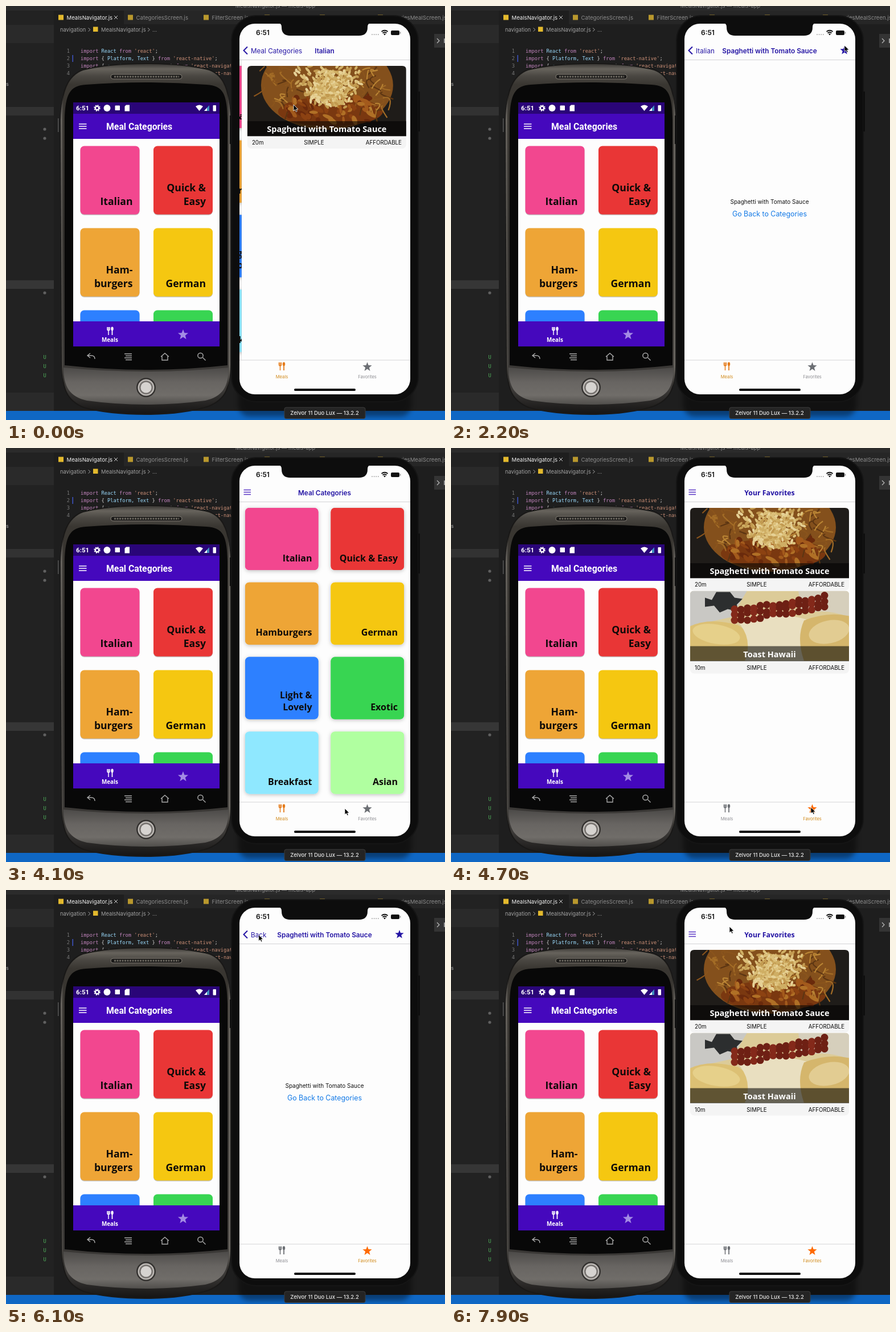
These frames come from a looping animation (771 px wide and 726 px high, 8 s). An HTML page:

```html
<!DOCTYPE html>
<html lang="en">
<head>
<meta charset="utf-8">
<title>Meals app on two phones</title>
<style>
html, body { margin: 0; width: 100%; height: 100%; overflow: hidden; background: #1e1e1e; }
svg { display: block; width: 100vw; height: 100vh; }
text { white-space: pre; }
.ui { font-family: Inter, "Liberation Sans", sans-serif; }
.bold { font-family: "Open Sans", sans-serif; font-weight: 700; }
.droid { font-family: Roboto, sans-serif; font-weight: 700; }
.code { font-family: "DejaVu Sans Mono", monospace; font-size: 8.7px; }
</style>
</head>
<body>
<svg id="stage" viewBox="0 0 771 726" preserveAspectRatio="none"></svg>
<script>
const LOOP = 8000, STEP = 100;
const INK = '#2414a4', VIOLET = '#4508bd';
const COLORS = ['#f2478f', '#e93636', '#eea536', '#f5c711', '#2d80ff', '#38d552', '#8fe8ff', '#b0ffa0'];

// Drawing helpers
const rect = (x, y, w, h, fill, r = 0, more = '') =>
  `<rect x="${x}" y="${y}" width="${w}" height="${h}" rx="${r}" fill="${fill}" ${more}/>`;
const circle = (x, y, r, fill, more = '') => `<circle cx="${x}" cy="${y}" r="${r}" fill="${fill}" ${more}/>`;
const ellipse = (x, y, rx, ry, fill, turn = 0) =>
  `<ellipse cx="${x}" cy="${y}" rx="${rx}" ry="${ry}" fill="${fill}" transform="rotate(${turn} ${x} ${y})"/>`;
const path = (d, fill, more = '') => `<path d="${d}" fill="${fill}" ${more}/>`;
const line = (d, color, width = 1, more = '') => path(d, 'none', `stroke="${color}" stroke-width="${width}" ${more}`);
const text = (x, y, s, size, fill, cls = 'ui', anchor = 'start', more = '') =>
  `<text x="${x}" y="${y}" font-size="${size}" fill="${fill}" class="${cls}" text-anchor="${anchor}" ${more}>${s.replace(/&/g, '&amp;')}</text>`;
const group = (id, body, more = '') => `<g id="${id}" ${more}>${body}</g>`;
const gradient = (id, stops, dir = 'x2="0" y2="1"') => `<linearGradient id="${id}" ${dir}>` +
  stops.map(([o, c, a = 1]) => `<stop offset="${o}" stop-color="${c}" stop-opacity="${a}"/>`).join('') + '</linearGradient>';
const range = n => [...Array(n).keys()];

function star(x, y, r, fill) {
  const points = range(10).map(i => {
    const a = Math.PI * (i / 5 - .5), q = i % 2 ? r * .42 : r;
    return `${(x + q * Math.cos(a)).toFixed(2)},${(y + q * Math.sin(a)).toFixed(2)}`;
  });
  return `<polygon points="${points.join(' ')}" fill="${fill}"/>`;
}
const cutlery = (x, y, color) =>
  line(`M${x - 5} ${y - 7}v4q0 2 2 2q2 0 2-2v-4M${x - 3} ${y - 7}v14`, color, 1.5) +
  line(`M${x + 3.5} ${y - 1}v8`, color, 1.8) + ellipse(x + 3.5, y - 4, 2.2, 3.4, color);
const burger = (x, y, w, gap, color) =>
  line([-1, 0, 1].map(i => `M${x} ${y + i * gap}h${w}`).join(''), color, 1.3);

function seeded(seed) {
  return () => (seed = (seed * 16807) % 2147483647) / 2147483647;
}

// Dish pictures in a 279 x 123 box
function spaghetti() {
  const rnd = seeded(77), pick = list => list[Math.floor(rnd() * list.length)];
  let out = rect(0, 0, 279, 123, '#1f1c19') + ellipse(140, 34, 116, 78, '#84501c') + ellipse(146, 80, 92, 26, '#7a3810');
  for (let i = 0; i < 60; i++) {
    const x = rnd() < .5 ? 26 + rnd() * 62 : 192 + rnd() * 52, y = rnd() * 78;
    out += line(`M${x} ${y}q${rnd() * 40 - 20} ${rnd() * 14 - 7} ${rnd() * 40 - 20} ${rnd() * 22}`, pick(['#b98434', '#a36c26', '#8a541c', '#5c3512']), 2.2);
  }
  for (let i = 0; i < 70; i++)
    out += ellipse(68 + rnd() * 150, 56 + rnd() * 42, 4 + rnd() * 6, 2 + rnd() * 3, pick(['#8c4212', '#a35a1c', '#6a2a0c', '#b07026']), rnd() * 90);
  for (let i = 0; i < 420; i++) {
    const y = 74 * Math.sqrt(rnd()) * rnd() ** .3, half = 74 - y * .55;
    out += ellipse(144 + (rnd() + rnd() - 1) * half, y, 3 + rnd() * 3, 2.2, pick(['#dcc07a', '#cfae64', '#c29a50', '#e6d196']), rnd() * 180);
  }
  return out;
}
function toast() {
  const rnd = seeded(19);
  let out = rect(0, 0, 279, 123, '#dccb98') + path('M0 0H100L72 46L0 62Z', '#c9c8c4') + path('M190 0H279V46Q240 30 196 40Z', '#d6cfbc');
  out += path('M26 12l12 4 8-14h24l8 10 14 2-10 10 2 12-18-4-14 6-10-12-16 2Z', '#2c2e2f');
  out += path('M0 62Q34 46 84 60Q112 76 100 123H0Z', '#dcc074') + ellipse(46, 76, 42, 17, '#e6d08a', 10);
  out += path('M80 50Q150 34 204 50Q186 84 206 123H96Q112 82 80 50Z', '#e9dfc0');
  out += path('M200 52Q240 36 279 44V123H200Q186 82 200 52Z', '#d5b66c') + ellipse(244, 72, 36, 20, '#e2cc92', -12);
  for (let i = 0; i < 45; i++) {
    const u = (i % 15) / 14;
    out += circle(78 + u * 158, 40 - u * 24 + Math.floor(i / 15) * 9 - 8 + rnd() * 5, 6.5, i % 3 ? '#6e2014' : '#84291a');
  }
  return out;
}

const defs = `<defs>
  ${gradient('body', [[0, '#34322f'], [.015, '#6a665f'], [.035, '#4a4742'], [.06, '#37342f'], [.5, '#2c2a27'], [.93, '#3a3836'], [1, '#0f0e0e']])}
  ${gradient('rim', [[0, '#85817a'], [.018, '#4b4844', .1], [.982, '#4b4844', .1], [1, '#85817a']], 'x2="1" y2="0"')}
  ${gradient('chin', [[0, '#4c4a48'], [.4, '#686562'], [.75, '#706d69'], [1, '#504e4b']])}
  ${gradient('edge', [[0, '#000', 0], [1, '#000', .08]], 'x2="1" y2="0"')}
  <clipPath id="ios">${rect(410, 31, 300, 650, '#fff', 27)}</clipPath>
  <clipPath id="content">${rect(410, 95, 300, 526, '#fff')}</clipPath>
  <clipPath id="droidList">${rect(118, 233, 257, 320, '#fff')}</clipPath>
  <clipPath id="photo"><path d="M0 123V7Q0 0 7 0H272Q279 0 279 7V123Z"/></clipPath>
  <filter id="soft" x="-20%" y="-20%" width="140%" height="140%"><feDropShadow dx="0" dy="1.5" stdDeviation="3.5" flood-opacity=".26"/></filter>
  <filter id="blur"><feGaussianBlur stdDeviation="4"/></filter>
  <g id="spaghetti" clip-path="url(#photo)">${spaghetti()}</g>
  <g id="toast" clip-path="url(#photo)">${toast()}</g>
</defs>`;

function editor() {
  const tab = (x, name, on) => rect(x, 15.5, 9, 9, on ? '#e3b92d' : '#b9982d') + text(x + 14.5, 24, name, 9.6, on ? '#f0f0f0' : '#8c8c8c');
  const code = (n, y, parts) => text(112, y, String(n), 8.7, '#777', 'code', 'end') +
    `<text x="131" y="${y}" class="code" xml:space="preserve">${parts.map(([s, c]) => `<tspan fill="${c}">${s}</tspan>`).join('')}</text>`;
  const K = '#c586c0', V = '#9cdcfe', W = '#d4d4d4', S = '#ce9178';
  const imports = (names, from) => [['import', K], [' { ', W], [names, V], [' } ', W], ['from', K], [` '${from}'`, S], [';', W]];
  return rect(0, 0, 771, 726, '#1e1e1e') +
    rect(0, 0, 771, 8, '#2b2b2b') + rect(84, 8, 687, 24, '#262626') + rect(84, 8, 123, 24, '#1e1e1e') +
    rect(0, 8, 84, 702, '#222') + rect(0, 33, 84, 32, '#2a2a2a') + rect(0, 177, 84, 15, '#323232') +
    rect(0, 481, 84, 15, '#363636') + rect(0, 678, 84, 32, '#2a2a2a') +
    text(473, 2.5, 'MealsNavigator.js — meals-app', 9.4, '#8a8a8a', 'ui', 'middle') +
    tab(92, 'MealsNavigator.js', true) + line('M190 17l6 6m0-6l-6 6', '#ccc') +
    tab(214, 'CategoriesScreen.js') + tab(347, 'FilterScreen.js') + [454, 551, 653].map(x => rect(x, 15.5, 9, 9, '#b9982d')).join('') +
    text(693, 24, 'riesMealScreen.js', 9.6, '#8c8c8c') +
    text(95, 45, 'navigation', 9.3, '#a0a0a0') + line('M144.500 38.500l3.500 3l-3.500 3', '#a0a0a0') +
    rect(153, 36.5, 8.5, 8.5, '#e3b92d') + text(167, 45, 'MealsNavigator.js', 9.4, '#a0a0a0') +
    line('M249 38.500l3.500 3l-3.500 3', '#a0a0a0') + text(257, 45, '...', 9.4, '#a0a0a0') +
    code(1, 82, [['import', K], [' React ', V], ['from', K], [" 'react'", S], [';', W]]) +
    code(2, 95, imports('Platform, Text', 'react-native')) +
    code(3, 108, imports('createStackNavigator', 'react-navigation-stack')) +
    code(4, 121, imports('createBottomTabNavigator', 'react-navigation-tabs')) +
    rect(116.5, 86, 1.5, 12, '#3f55c8') + text(0, 140, 's', 9, '#aaa') +
    [216, 232, 503].map(y => circle(68, y, 2.6, '#606060')).join('') +
    [619, 635, 651].map(y => text(68, y, 'U', 9, '#4fae5a', 'code', 'middle')).join('') +
    rect(0, 710, 771, 16, '#0f67c4') +
    rect(752, 49, 19, 24, '#343434') + line('M757 57l4 4l-4 4', '#bbb', 1.2) + line('M770 57v8', '#bbb', 1.5);
}

function tile(x, y, w, h, color, lines, size, lineHeight, pad, base) {
  return rect(x, y, w, h, color, 7) + lines.map((s, i) =>
    text(x + w - pad, y + base - (lines.length - 1 - i) * lineHeight, s, size, '#0d0a08', 'bold', 'end')).join('');
}

function android() {
  const names = [['Italian'], ['Quick &', 'Easy'], ['Ham-', 'burgers'], ['German'], [''], ['']];
  const shell = 'M96 200C97 150 108 122 135 112Q180 101 246 101Q312 101 357 112C384 122 393 150 394 200V630C393 672 385 690 355 702Q310 716 246 716Q180 716 137 704C107 692 99 672 98 630Z';
  return path(shell, 'url(#body)', 'stroke="#171615" stroke-width="2"') + path(shell, 'url(#rim)') +
    path('M103 200C104 154 112 140 140 138Q246 130 352 138C382 140 388 154 389 200V630Q246 646 103 630Z', '#080808') +
    path('M101 634Q246 648 391 634C391 668 380 685 350 692Q246 706 142 692C112 685 101 668 101 634Z', 'url(#chin)') +
    rect(184, 120, 125, 8, '#1b1a19', 4, 'stroke="#807b72"') + line('M190 124H304', '#6d6961', 3, 'stroke-dasharray="3 1.5"') +
    rect(393, 192, 3, 50, '#111') + rect(91, 197, 1.5, 24, '#555') +
    rect(118, 169, 257, 20, '#2a0578') + rect(118, 189, 257, 44, VIOLET) + rect(118, 233, 257, 320, '#fdfdfd') +
    text(123, 183, '6:51', 11.6, '#fff', 'droid') +
    circle(160, 179, 3.2, 'none', 'stroke="#fff" stroke-width="2.4"') + circle(160, 179, 5, 'none', 'stroke="#fff" stroke-width="1.5" stroke-dasharray="2 1.93"') +
    circle(177.5, 179, 6, '#fff') + rect(191.5, 174.5, 8.5, 8.5, '#fff', 1) + path('M211 173.5h6v11h-8.5v-8.5z', '#fff') +
    path('M333 176q6.5-5 13 0l-6.5 8z', '#fff') + path('M348 184l9-10v10z', '#3d8fc0') + path('M348 184l5-5.5v5.5z', '#fff') + rect(363.5, 174, 5.5, 10.5, '#fff', 1) +
    burger(128, 211, 13.5, 4, '#fff') + text(176, 217, 'Meal Categories', 15.8, '#fff', 'droid') +
    `<g clip-path="url(#droidList)">` + names.map((lines, i) => {
      const x = i % 2 ? 259 : 130.5, y = 245.5 + 144 * Math.floor(i / 2);
      return rect(x, y + 1.3, 104, 120, '#00000040', 7) + tile(x, y, 104, 120, COLORS[i], lines, 17.6, 24, 12, 103);
    }).join('') + '</g>' +
    rect(118, 553, 257, 44, VIOLET) + cutlery(183, 570, '#fff') + text(182.5, 589, 'Meals', 9.9, '#fff', 'bold', 'middle') + star(311, 576.5, 9.5, '#a48be4') +
    line('M156 619q0-6-6-6h-6m4-4l-5 4l5 4M208 610h13M210 613.500h11M208 617h13M210 620.500h11M272 615l7-6l7 6M274 614v7h10v-7M345.500 616.500l5 5', '#a9a9a9', 1.4) +
    circle(341.5, 613, 4.6, 'none', 'stroke="#a9a9a9" stroke-width="1.5"') +
    circle(246, 669, 17, '#33312f') + circle(246, 669, 14.5, '#bdb9b5') + circle(246, 669, 12, '#75716e') + circle(246, 669, 9.5, '#d6d3d0');
}

// Screens of the right phone
const page = (id, body) => group(id, rect(404, 95, 6, 526, 'url(#edge)') + rect(410, 95, 300, 526, '#fdfdfd') + body);
function mealCard(id, y, photo, name, time) {
  const info = (x, s, anchor) => text(x, y + 138, s, 9.75, '#0a0a0a', 'ui', anchor);
  return group(id, rect(420, y, 279, 145, '#f4f4f4', 7) +
    `<use href="#${photo}" x="420" y="${y}"/>` + rect(420, y + 97, 279, 26.5, '#000', 0, 'opacity=".56"') +
    text(559.5, y + 116, name, 14.5, '#fff', 'bold', 'middle') +
    info(428, time, 'start') + info(537, 'SIMPLE', 'middle') + info(691, 'AFFORDABLE', 'end'));
}
const dish = 'Spaghetti with Tomato Sauce';
const categories = () => [['Italian'], ['Quick & Easy'], ['Hamburgers'], ['German'], ['Light &', 'Lovely'], ['Exotic'], ['Breakfast'], ['Asian']]
  .map((lines, i) => {
    const x = i % 2 ? 570.5 : 420, y = 105 + 130.8 * Math.floor(i / 2);
    return rect(x, y, 128.5, 109, COLORS[i], 7, 'filter="url(#soft)"') + tile(x, y, 128.5, 109, COLORS[i], lines, 16, 21.5, 11, 93.5);
  }).join('');
const detail = () => text(559.5, 347, dish, 10, '#111', 'ui', 'middle') + text(559.5, 368.500, 'Go Back to Categories', 12.4, '#1279e6', 'ui', 'middle');
const title = (s, cls = 'ui') => text(559.5, 82.5, s, cls === 'bold' ? 12.3 : 11.8, INK, cls, 'middle', cls === 'ui' ? 'font-weight="600"' : '');
const back = s => line('M424 71.500l-6.500 6.500l6.500 6.500', INK, 2) + text(430, 82.5, s, 11.7, INK);
const menu = burger(417.5, 77.5, 12.5, 4, '#5a35c4');

function tabs(id, meals, favs) {
  return group(id, cutlery(484.5, 632, meals[0]) + text(484.5, 653, 'Meals', 7.6, meals[1], 'ui', 'middle') +
    star(634.5, 633, 8.5, favs[0]) + text(634.5, 653, 'Favorites', 7.6, favs[1], 'ui', 'middle'));
}

function iphone() {
  const headers = [['h0', menu + title('Meal Categories')], ['h1', back('Meal Categories') + title('Italian')],
    ['h2', back('Italian') + title(dish) + star(691, 78, 8, INK)],
    ['k0', menu + title('Your Favorites', 'bold')], ['k1', back('Back') + title(dish) + star(691, 78, 8, INK)]];
  return rect(408, 660, 304, 60, '#000', 20, 'opacity=".4" filter="url(#blur)"') +
    rect(396, 17, 328, 677, '#0d0d0d', 44, 'stroke="#151515" stroke-width="2"') + rect(724, 150, 3, 70, '#0e0e0e') +
    `<g clip-path="url(#ios)">` + rect(410, 31, 300, 650, '#fdfdfd') +
    `<g clip-path="url(#content)">` + page('p0', categories()) + page('p1', mealCard('italianCard', 105, 'spaghetti', dish, '20m')) + page('p2', detail()) +
    page('q0', mealCard('favCard', 105, 'spaghetti', dish, '20m') + mealCard('toastCard', 250.5, 'toast', 'Toast Hawaii', '10m')) + page('q1', detail()) + '</g>' +
    headers.map(([id, body]) => group(id, body)).join('') +
    line('M410 94.500h300M410 621h300', '#d4d4d6') +
    tabs('mealsOn', ['#e57c1c', '#d18a1a'], ['#6c6f74', '#8e8e93']) + tabs('favsOn', ['#6c6f74', '#8e8e93'], ['#ff6a00', '#d18a1a']) +
    path('M479 30Q484 31 484 37Q484 52 499 52H620Q635 52 635 37Q635 31 640 30Z', '#0d0d0d') +
    text(439, 51, '6:51', 12, '#111', 'ui', 'start', 'font-weight="600"') +
    range(4).map(i => circle(643 + i * 3.6, 50, 1, '#aaa')).join('') +
    line('M659.500 45q5.500-4.500 11 0M661.500 47.500q3.500-3 7 0', '#111', 1.7) + path('M663 49q2-1.500 4 0l-2 2.500z', '#111') +
    rect(676, 43, 15, 8, '#111', 2) + rect(692, 45.5, 1.2, 3, '#777') +
    rect(506, 671, 108, 4, '#080808', 2) + '</g>' +
    rect(489, 704, 142, 19.5, '#242424', 3, 'stroke="#3c3c3c"') + text(559.5, 717.2, 'Zelvor 11 Duo Lux — 13.2.2', 9.5, '#e8e8e8', 'ui', 'middle', 'font-weight="500"');
}

const stage = document.getElementById('stage');
stage.innerHTML = defs + editor() + iphone() + android() +
  group('cursor', path('M0 0V11L2.600 8.700L4.400 12.500L6.300 11.600L4.500 8H8Z', '#000', 'stroke="#fff" stroke-width=".8"'));
const el = Object.fromEntries([...stage.querySelectorAll('[id]')].map(node => [node.id, node]));

// Motion: [start, from depth, to depth]
const mealMoves = [[-330, 0, 1], [765, 1, 2], [2700, 2, 1], [3300, 1, 0]];
const favMoves = [[5550, 0, 1], [6300, 1, 0], [7065, 0, 1], [7400, 1, 0]];
const presses = { italianCard: [600, 1000], favCard: [5400, 5700] };
const TAB_SWITCH = 4500;
const pointer = [[0, 505, 173], [800, 508, 186], [1300, 540, 160], [1900, 690, 72], [2200, 691, 69], [2600, 430, 74], [3400, 430, 75],
  [4100, 595, 632], [4400, 632, 630], [4700, 632, 630], [5300, 616, 140], [5600, 616, 136], [6200, 430, 74], [6500, 430, 74],
  [6950, 603, 180], [7150, 603, 180], [7350, 432, 72], [7550, 432, 72], [7900, 489, 64]];

const clamp = (v, lo = 0, hi = 1) => Math.min(hi, Math.max(lo, v));
const cubic = (u, a, b) => 3 * (1 - u) ** 2 * u * a + 3 * (1 - u) * u * u * b + u ** 3;
function ease(p) {
  if (p >= 1) return 1;
  let lo = 0, hi = 1;
  for (let i = 0; i < 20; i++) {
    const mid = (lo + hi) / 2;
    if (cubic(mid, .2833, .31833) < p) lo = mid; else hi = mid;
  }
  return cubic(lo, .99, .99);
}
function depthAt(moves, t) {
  let depth = 0;
  for (const [start, from, to] of moves)
    if (t >= start) depth = from + (to - from) * ease(clamp((t - start) / 500));
  return depth;
}
function pointerAt(t) {
  const i = Math.max(1, pointer.findIndex(k => k[0] >= t));
  const [t0, x0, y0] = pointer[i - 1], [t1, x1, y1] = pointer[i];
  const p = clamp((t - t0) / (t1 - t0)), s = p * p * (3 - 2 * p);
  return [x0 + (x1 - x0) * s, y0 + (y1 - y0) * s];
}
const show = (node, on) => node.setAttribute('display', on ? 'inline' : 'none');

function showStack(pages, headers, count, depth, active) {
  for (let i = 0; i < count; i++) {
    const rel = clamp(i - depth, -1, 1), away = Math.abs(rel);
    const node = el[pages + i], header = el[headers + i];
    show(node, active && away < .999);
    node.setAttribute('transform', `translate(${rel * (rel > 0 ? 300 : 90)} 0)`);
    show(header, active && away < .999);
    header.setAttribute('opacity', clamp(rel > 0 ? 1 - away * 1.35 : 1 - (away - .25) / .5));
  }
}

function render(t) {
  const favs = t >= TAB_SWITCH;
  showStack('p', 'h', 3, depthAt(mealMoves, t), !favs);
  showStack('q', 'k', 2, depthAt(favMoves, t), favs);
  show(el.mealsOn, !favs);
  show(el.favsOn, favs);
  for (const [id, [down, up]] of Object.entries(presses))
    el[id].setAttribute('opacity', t >= down && t < up ? .38 : 1);
  el.cursor.setAttribute('transform', `translate(${pointerAt(Math.min(t, 7900)).join(' ')})`);
}

const begin = performance.now();
function tick() {
  const t = (performance.now() - begin) % LOOP;
  render(Math.floor(t / STEP) * STEP);
  requestAnimationFrame(tick);
}
tick();
</script>
</body>
</html>
```
